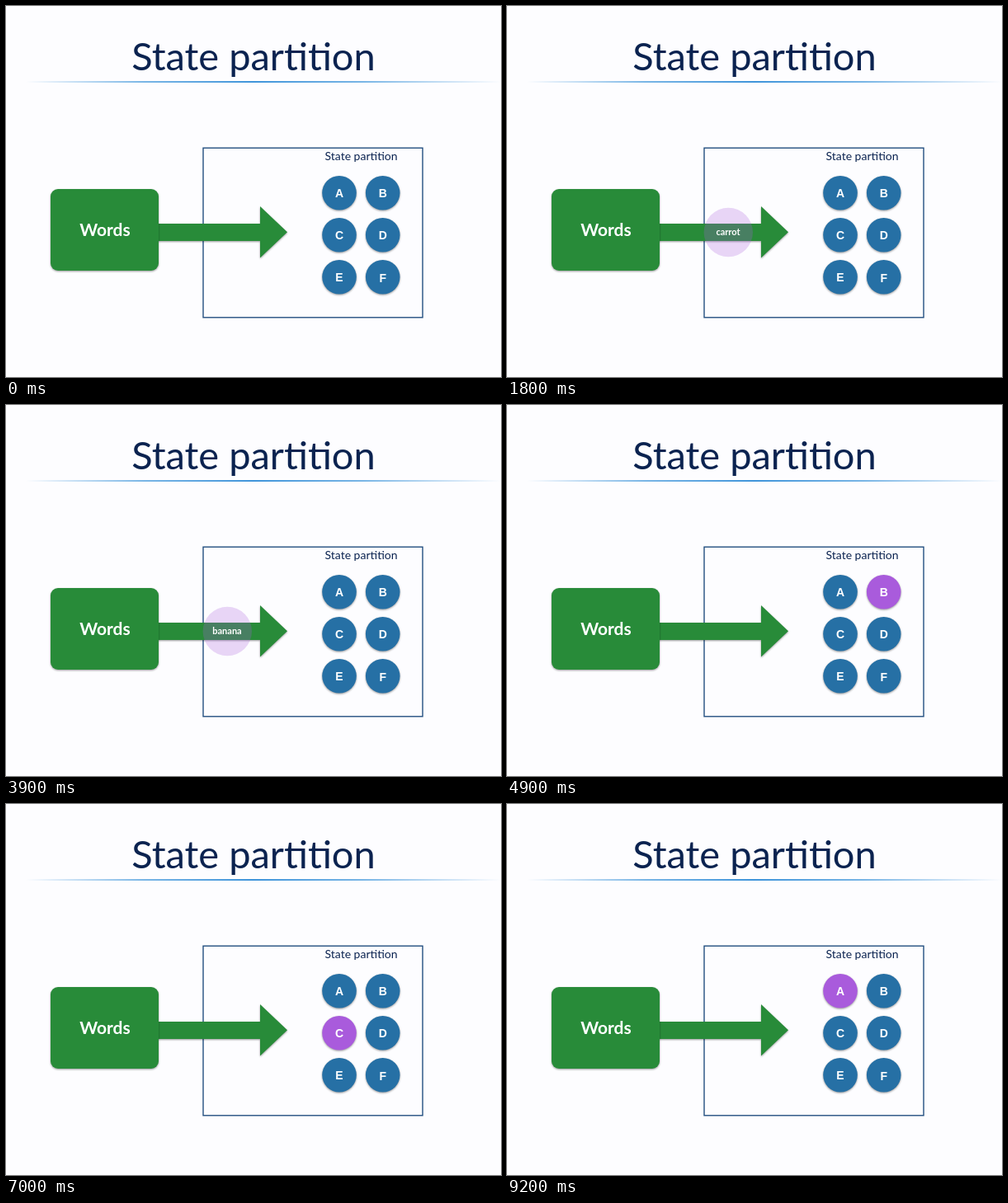
Write an HTML page that moves like this. It is 600x450 px and loops after 9.3 s.

```html
<!DOCTYPE html>
<html lang="en">
<head>
<meta charset="utf-8">
<title>State partition</title>
<style>
  html, body { margin: 0; width: 100%; height: 100%; overflow: hidden; background: #fdfdff; }
  svg { display: block; width: 100vw; height: 100vh; }
  text { font-family: Lato, "Open Sans", sans-serif; text-anchor: middle; }
  .head { fill: #0b2350; }
  .bold { fill: #fff; font-weight: 700; }
  .key { font: 700 14px "Liberation Sans", Arial, sans-serif; fill: #fff; }
  .soft { filter: drop-shadow(0 1px 1px rgba(0, 0, 0, .4)); }
</style>
</head>
<body>
<svg viewBox="0 0 600 450">
  <defs>
    <linearGradient id="rule">
      <stop offset="0.04" stop-color="#4c9ddd" stop-opacity="0"/>
      <stop offset="0.28" stop-color="#4c9ddd" stop-opacity="0.75"/>
      <stop offset="0.5" stop-color="#3f94da"/>
      <stop offset="0.72" stop-color="#4c9ddd" stop-opacity="0.75"/>
      <stop offset="1" stop-color="#4c9ddd" stop-opacity="0"/>
    </linearGradient>
  </defs>
  <rect width="600" height="450" fill="#fdfdff"/>
  <text class="head" x="300" y="78" font-size="47">State partition</text>
  <rect y="91" width="600" height="2" fill="url(#rule)"/>
  <rect x="239" y="172.2" width="266" height="205.6" fill="none" stroke="#234f80" stroke-width="1.4"/>
  <text class="head" x="430.5" y="187" font-size="14">State partition</text>
  <g fill="#288b39">
    <path class="soft" d="M180 264H308V243L341 274.3L308 305.5V285H180Z"/>
    <rect class="soft" x="54" y="222" width="131" height="99" rx="9"/>
  </g>
  <text class="bold" x="120" y="278.5" font-size="21">Words</text>
  <g id="cells"></g>
  <g id="bubble">
    <circle cx="268.3" cy="274.5" r="29.7" fill="#a95bdc" fill-opacity="0.25"/>
    <text id="word" class="bold" x="268" y="278" font-size="11"></text>
  </g>
</svg>
<script>
  const LOOP = 9300;
  const WORDS = [["carrot", "C"], ["banana", "B"], ["celery", "C"], ["apple", "A"]];
  const STEP = LOOP / (1 + WORDS.length * 2);
  const byId = id => document.getElementById(id);

  function add(parent, tag, attrs, label = "") {
    const el = document.createElementNS("http://www.w3.org/2000/svg", tag);
    for (const name in attrs) el.setAttribute(name, attrs[name]);
    el.textContent = label;
    return parent.appendChild(el);
  }

  const cells = [..."ABCDEF"].map((key, i) => {
    const x = 404 + (i % 2) * 52.7;
    const y = 226.8 + Math.floor(i / 2) * 51;
    const disc = add(byId("cells"), "circle", { cx: x, cy: y, r: 20.8, class: "soft" });
    add(byId("cells"), "text", { x, y: y + (key === "F" ? 6 : 5), class: "key" }, key);
    return { key, disc };
  });

  // An idle step first, then each word shows and its partition lights up.
  function draw(time) {
    const step = Math.floor((time % LOOP) / STEP) - 1;
    const [word, target] = step < 0 ? ["", ""] : WORDS[step >> 1];
    const arriving = step >= 0 && step % 2 === 0;
    byId("bubble").style.display = arriving ? "" : "none";
    byId("word").textContent = word;
    for (const { key, disc } of cells) {
      disc.setAttribute("fill", !arriving && key === target ? "#a95bdc" : "#2670a5");
    }
  }

  const start = performance.now();
  function tick() {
    draw(performance.now() - start);
    requestAnimationFrame(tick);
  }
  tick();
</script>
</body>
</html>
```
